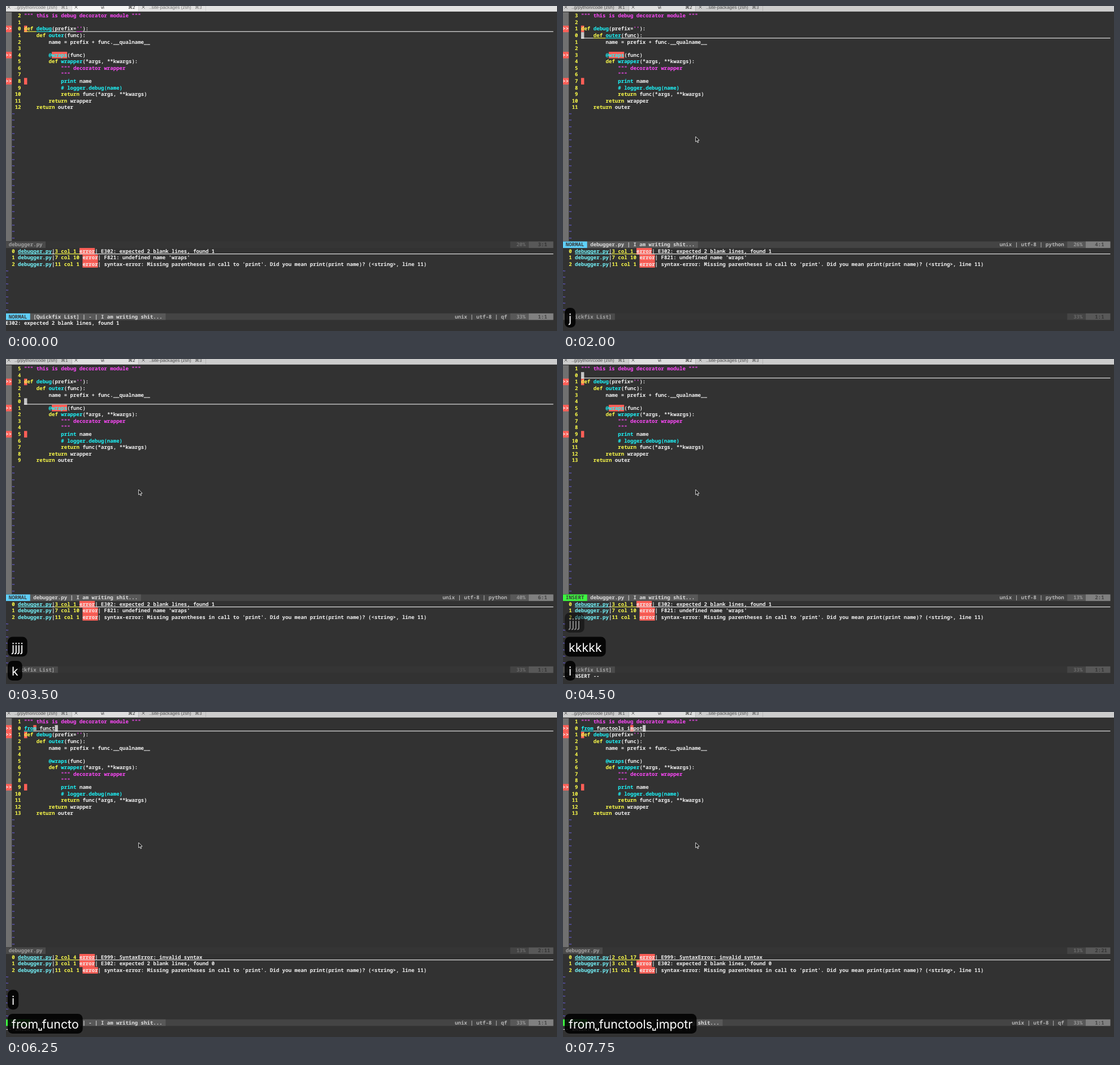
Write an HTML page with a canvas that moves like this. It is 975 px wide and 575 px high and loops after 8 s.

```html
<!DOCTYPE html>
<html lang="en">
<head>
<meta charset="utf-8">
<title>Linting in the terminal</title>
<style>
  html, body { margin: 0; width: 100%; height: 100%; overflow: hidden; background: #323232; }
  canvas { display: block; }
</style>
</head>
<body>
<canvas id="stage" width="975" height="575"></canvas>
<script>
const ctx = document.getElementById('stage').getContext('2d');
const LOOP = 8000, TICK = 250;

// Terminal grid
const CW = 5.445, CH = 11.57, X0 = -0.7, Y0 = 11.6, COLS = 178;
const MONO = `bold ${CW / 0.6}px "Noto Sans Mono", monospace`;
const BG = '#323232', RED = '#ff5f57', WHITE = '#f0f0f0';
const INK = { w: WHITE, y: '#ffff4a', c: '#1cf6fb', m: '#ff48fb', b: '#7468ff', f: '#74f4fb' };

const CODE = [
  '^m""" this is debug decorator module """',
  '',
  "^ydef ^cdebug^w(prefix=^m''^w):",
  '    ^ydef ^couter^w(func):',
  '^w        name = prefix + func.__qualname__',
  '',
  '        ^c@wraps^w(func)',
  '        ^ydef ^cwrapper^w(*args, **kwargs):',
  '            ^m""" decorator wrapper',
  '            ^m"""',
  '            ^cprint ^wname',
  '            ^c# logger.debug(name)',
  '            ^yreturn ^wfunc(*args, **kwargs)',
  '        ^yreturn ^wwrapper',
  '    ^yreturn ^wouter'
];
const SYNTAX = "syntax-error: Missing parentheses in call to 'print'. Did you mean print(print name)? (<string>, line 11)";
const TYPED = 'from functools impotr';

// Value of the last [tick, value] pair already reached
const at = (steps, k) => steps.reduce((v, s) => k >= s[0] ? s[1] : v, null);

const LINE = [[0, 3], [8, 4], [9, 6], [10, 7], [14, 6], [15, 2]];
const LENGTH = [[0, 0], [21, 1], [22, 3], [23, 5], [24, 9], [25, 10], [26, 12],
  [27, 14], [28, 16], [29, 18], [30, 19], [31, 20]];
const MESSAGE = [[0, 'E302: expected 2 blank lines, found 1'], [8, ''],
  [11, "F821: undefined name 'wraps'"], [14, ''], [18, '-- INSERT --']];
const POINTER = [[0, null], [1, [334, 124]], [2, [332, 124]], [3, [330, 124]],
  [4, [330, 123]], [5, [234, 230.5]]];

const colX = c => X0 + c * CW;
const rowY = r => Y0 + r * CH;

function cells(col, row, n, color) {
  ctx.fillStyle = color;
  ctx.fillRect(colX(col), rowY(row), n * CW, CH);
}

function text(col, row, s, color) {
  ctx.font = MONO;
  ctx.fillStyle = color;
  ctx.fillText(s, colX(col), rowY(row) + 8.7);
}

function underline(col, row, n, color) {
  ctx.fillStyle = color;
  ctx.fillRect(colX(col), rowY(row) + 9.95, n * CW, 1.1);
}

// Draws "^c" colour markup, with a coloured underline on the cursor line
function rich(col, row, markup, lined) {
  let color = INK.w;
  for (const part of markup.split(/(\^[a-z])/)) {
    if (/^\^[a-z]$/.test(part)) { color = INK[part[1]]; continue; }
    if (lined) underline(col, row, part.length, color);
    text(col, row, part, color);
    col += part.length;
  }
  if (lined) underline(col, row, COLS - col, WHITE);
}

function tabBar(focused) {
  ctx.fillStyle = focused ? '#cdcdcd' : '#e2e2e2';
  ctx.fillRect(0, 0, 975, 10);
  ctx.fillStyle = focused ? '#dfdfdf' : '#f5f5f5';
  ctx.fillRect(116, 0, 118, 10);
  ctx.fillStyle = focused ? '#b4b4b4' : '#cfcfcf';
  for (const x of [116, 234, 353]) ctx.fillRect(x, 0, 1, 10);
  ctx.fillRect(0, 9, 975, 1);
  ctx.font = '8.1px "Liberation Sans", Arial, sans-serif';
  const label = (s, x, c) => { ctx.fillStyle = c; ctx.fillText(s, x, 5); };
  const dim = focused ? '#4c4c4c' : '#707070';
  label('..g/python/code (zsh)', 15, dim);
  label('⌘1', 97, dim);
  label('vi', 168, '#222');
  label('⌘2', 216, '#222');
  label('..site-packages (zsh)', 253, dim);
  label('⌘3', 334, dim);
  ctx.strokeStyle = '#606060';
  ctx.lineWidth = 1;
  ctx.beginPath();
  for (const x of [5, 124, 243]) {
    ctx.moveTo(x - 2.5, -0.5); ctx.lineTo(x + 2.5, 4.5);
    ctx.moveTo(x + 2.5, -0.5); ctx.lineTo(x - 2.5, 4.5);
  }
  ctx.stroke();
}

function statusBar(row, o) {
  const chip = (col, s, fg, bg) => {
    cells(col, row, s.length, bg);
    text(col, row, s, fg);
    return col + s.length;
  };
  const percent = `  ${o.percent}% `, place = `   ${o.place}`.padEnd(8);
  cells(0, row, COLS, o.active ? '#444444' : '#353535');
  if (o.active) {
    const col = chip(0, ` ${o.mode} `, '#3a3a3a', o.mode === 'INSERT' ? '#3cf83f' : '#5fd0fa');
    chip(col, ` ${o.name}${o.flag} | I am writing shit... `, '#dcdcdc', '#585858');
    const info = `unix | utf-8 | ${o.type}`;
    text(163 - info.length, row, info, '#b4b4b4');
    chip(164, percent, '#969696', '#585858');
    chip(170, place, '#444444', '#808080');
  } else {
    chip(0, ` ${o.name} `, '#a0a0a0', '#4a4a4a');
    chip(164, percent, '#6a6a6a', '#444444');
    chip(170, place, '#353535', '#585858');
  }
}

function editor(k, line, len) {
  const linted = k >= 25, cur = line - 1;
  ctx.fillStyle = '#707070';
  ctx.fillRect(0, 11, 10.2, 405);
  for (let r = 15; r < 35; r++) text(2, r, '~', INK.b);

  for (const r of [2, linted ? 1 : 6, 10]) {
    cells(0, r, 2, RED);
    text(0, r, '>>', WHITE);
  }
  cells(6, 2, 1, RED);
  cells(6, 10, 1, RED);
  if (!linted) cells(15, 6, 5, RED);
  else cells(6 + (k >= 31 ? 16 : 3), 1, 1, RED);

  if (k >= 4) cells(6 + len, cur, 1, '#c6c6c6');
  CODE.forEach((src, r) => {
    text(2, r, String(Math.abs(r - cur)).padStart(3), INK.y);
    const typed = TYPED.slice(0, len);
    const row = r === 1 && len ? (len < 4 ? typed : '^cfrom^w' + typed.slice(4)) : src;
    rich(6, r, row, r === cur);
  });
}

function quickfix(k) {
  const print = ['11 col 1', SYNTAX], e302 = 'E302: expected 2 blank lines, found ';
  const list = k < 25
    ? [['3 col 1', e302 + 1], ['7 col 10', "F821: undefined name 'wraps'"], print]
    : [[k < 31 ? '2 col 4' : '2 col 17', 'E999: SyntaxError: invalid syntax'], ['3 col 1', e302 + 0], print];
  list.forEach(([pos, msg], i) => {
    const r = 36 + i;
    text(2, r, String(i), INK.y);
    cells(17 + pos.length, r, 5, RED);
    rich(4, r, `^fdebugger.py^w|^y${pos} ^werror| ${msg}`, i === 0);
  });
  for (let r = 39; r < 46; r++) text(0, r, '~', INK.b);
}

function bubble(s, slot, alpha) {
  const gap = 6.5, pad = 7, top = 534 - slot * 42.5, base = top + 26;
  ctx.font = '21.4px Inter, sans-serif';
  const words = s.split(' ');
  const wide = words.reduce((w, p) => w + ctx.measureText(p).width, gap * (words.length - 1));
  ctx.globalAlpha = alpha;
  ctx.fillStyle = 'rgba(0,0,0,0.88)';
  ctx.beginPath();
  ctx.roundRect(3, top, wide + pad * 2, 35, 8.5);
  ctx.fill();
  ctx.fillStyle = ctx.strokeStyle = '#fff';
  ctx.lineWidth = 1.7;
  let x = 3 + pad;
  words.forEach((word, i) => {
    if (i) {
      ctx.beginPath();
      ctx.moveTo(x + 1, base - 1);
      ctx.lineTo(x + 1, base + 3);
      ctx.lineTo(x + gap - 1, base + 3);
      ctx.lineTo(x + gap - 1, base - 1);
      ctx.stroke();
      x += gap;
    }
    ctx.fillText(word, x, base);
    x += ctx.measureText(word).width;
  });
  ctx.globalAlpha = 1;
}

function keys(k, len) {
  const FADED = 0.5;
  if (k >= 8 && k < 19) {
    const js = at([[8, 'j'], [9, 'jjj'], [10, 'jjjj']], k);
    bubble(js, k < 14 ? 0 : k < 18 ? 1 : 2, k === 18 ? FADED : 1);
  }
  if (k >= 14 && k < 24) {
    bubble(k === 14 ? 'k' : 'kkkkk', k < 18 ? 0 : k < 21 ? 1 : 2, k === 23 ? FADED : 1);
  }
  if (k >= 18 && k < 26) bubble('i', k < 21 ? 0 : 1, 1);
  if (len) bubble(TYPED.slice(0, len + 1), 0, 1);
}

function pointer([x, y]) {
  ctx.save();
  ctx.translate(x + 0.7, y + 0.5);
  ctx.beginPath();
  ctx.moveTo(0, 0);
  for (const [px, py] of [[0, 9.2], [2.1, 7.4], [3.5, 10.8], [5, 10.2], [3.6, 6.9], [6.4, 6.6]]) ctx.lineTo(px, py);
  ctx.closePath();
  ctx.fillStyle = '#111';
  ctx.fill();
  ctx.strokeStyle = '#f4f4f4';
  ctx.lineWidth = 0.9;
  ctx.stroke();
  ctx.restore();
}

function draw(t) {
  const k = Math.floor(t / TICK);
  const line = at(LINE, k), len = at(LENGTH, k), spot = at(POINTER, k);
  const inList = k < 4 || k >= 25, mode = k < 18 ? 'NORMAL' : 'INSERT';

  ctx.textRendering = 'geometricPrecision';
  ctx.fillStyle = BG;
  ctx.fillRect(0, 0, 975, 575);
  tabBar(k >= 4);
  editor(k, line, len);
  statusBar(35, {
    active: !inList, mode, name: 'debugger.py', flag: len ? ' | +' : '', type: 'python',
    percent: Math.floor(line / 15 * 100), place: `${line}:${len + 1}`
  });
  quickfix(k);
  statusBar(46, {
    active: inList, mode, name: '[Quickfix List]', flag: ' | -', type: 'qf', percent: 33, place: '1:1'
  });
  text(0, 47, at(MESSAGE, k), WHITE);
  if (spot) pointer(spot);
  keys(k, len);
}

const start = performance.now();
function frame() {
  draw((performance.now() - start) % LOOP);
  requestAnimationFrame(frame);
}
frame();
</script>
</body>
</html>
```
